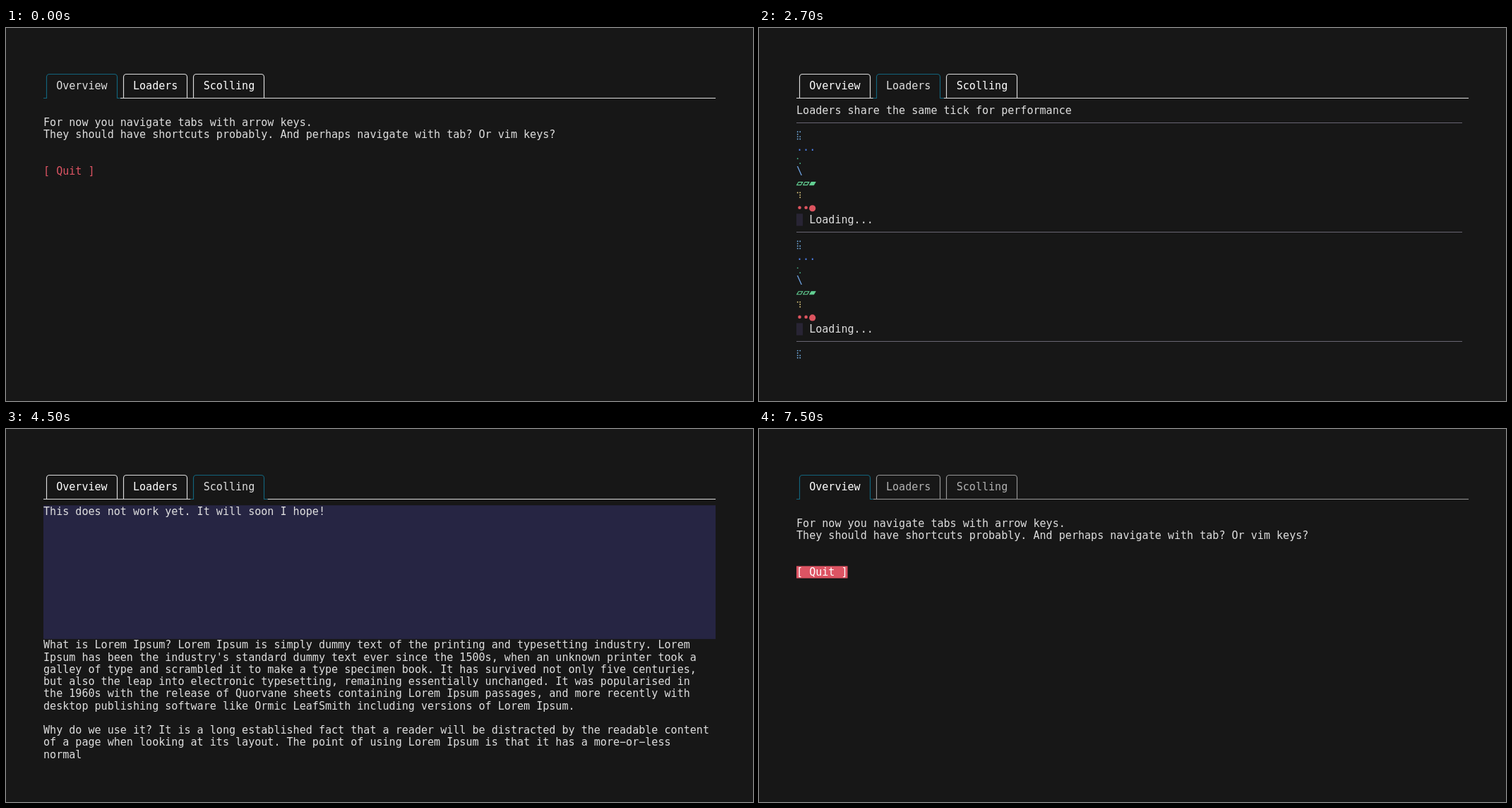
Write an HTML page with a canvas that moves like this. It is 1058 by 529 pixels and loops after 8 s.

```html
<!DOCTYPE html>
<html lang="en">
<head>
<meta charset="utf-8">
<title>Terminal tabs</title>
<style>
html, body { margin: 0; width: 100%; height: 100%; overflow: hidden; background: #171717; }
canvas { display: block; }
</style>
</head>
<body>
<canvas id="stage" width="1058" height="529"></canvas>
<script>
const ctx = document.getElementById('stage').getContext('2d');
const LOOP = 8000, CELL_W = 9.067, CELL_H = 17.24, COLS = 105;
const BG = '#171717', FG = '#dedede', BRIGHT = '#ffffff', DIM = '#b2b2b2';
const TEAL = '#12647c', RED = '#dd5463', RULE = '#686572', PANEL = '#262543';

const X = col => 53 + col * CELL_W;
const Y = row => 65.1 + row * CELL_H; // centre of a row
const snap = v => Math.floor(v) + 0.5;

function text(col, row, str, color = FG) {
  ctx.fillStyle = color;
  [...str.replaceAll('-', '\u2212')].forEach((ch, i) => ctx.fillText(ch, X(col + i), Y(row) + 5));
}

function cells(col, row, w, h, color) {
  ctx.fillStyle = color;
  ctx.fillRect(X(col), Y(row) - CELL_H / 2, w * CELL_W, h * CELL_H);
}

function line(color, ...points) {
  ctx.strokeStyle = color;
  ctx.beginPath();
  points.forEach(([x, y]) => ctx.lineTo(x, y));
  ctx.stroke();
}

function circle(x, y, r) {
  ctx.beginPath();
  ctx.arc(x, y, r, 0, 7);
  ctx.fill();
}

// Tabs: label, first column, last column
const TABS = [['Overview', 0, 11], ['Loaders', 12, 22], ['Scolling', 23, 34]];

function drawTabs(active, focused) {
  const top = snap(Y(0)), base = snap(Y(2));
  const edge = focused ? '#dcdcdc' : '#979797';
  const [, first, last] = TABS[active];
  if (first) line(edge, [X(0), base], [X(first), base]);
  line(edge, [X(last + 1), base], [X(COLS), base]);
  TABS.forEach(([label, a, b], i) => {
    const on = i === active, l = snap(X(a + 0.5) - 0.3), r = snap(X(b + 0.5) - 0.2);
    ctx.strokeStyle = on ? TEAL : edge;
    ctx.beginPath();
    if (on) ctx.moveTo(X(a), base);
    ctx.lineTo(l, base);
    ctx.arcTo(l, top, r, top, 4);
    ctx.arcTo(r, top, r, base, 4);
    ctx.lineTo(r, base);
    if (on) ctx.lineTo(X(b + 1), base);
    ctx.stroke();
    const color = on ? (focused ? FG : BRIGHT) : (focused ? BRIGHT : DIM);
    text(a + 2, 1, label, color);
  });
}

function drawOverview(quitFocused) {
  text(0, 4, 'For now you navigate tabs with arrow keys.');
  text(0, 5, 'They should have shortcuts probably. And perhaps navigate with tab? Or vim keys?');
  if (quitFocused) cells(0, 8, 8, 1, RED);
  text(0, 8, '[ Quit ]', quitFocused ? BRIGHT : RED);
}

function braille(row, ch, color) {
  const bits = ch.codePointAt(0) - 0x2800;
  ctx.fillStyle = color;
  for (let i = 0; i < 8; i++) {
    if (!(bits >> i & 1)) continue;
    const col = i < 6 ? Math.floor(i / 3) : i - 6;
    const dotRow = i < 6 ? i % 3 : 3;
    circle(54.7 + col * 3.5, Y(row) - 4 + dotRow * 3.4, 0.95);
  }
}

function meter(row, full) {
  const y = Y(row) + 0.3;
  ctx.fillStyle = ctx.strokeStyle = '#62cf92';
  for (let i = 0; i < 3; i++) {
    const x = X(i) + 0.7;
    ctx.beginPath();
    ctx.moveTo(x, y + 2);
    ctx.lineTo(x + 2.4, y - 2);
    ctx.lineTo(x + 8, y - 2);
    ctx.lineTo(x + 5.6, y + 2);
    ctx.closePath();
    if (i === full) ctx.fill();
    ctx.stroke();
  }
}

function points(row, big) {
  ctx.fillStyle = '#dc545f';
  for (let i = 0; i < 3; i++) {
    const on = i === big;
    circle(X(i + 0.5), Y(row) + (on ? 1 : 0), on ? 4.6 : 2.3);
  }
}

function pulse(row, step) {
  ctx.globalAlpha = [1, 0.75, 0.25, 0.125][step];
  cells(0, row, 1, 1, '#a27dfa');
  ctx.globalAlpha = 1;
  text(2, row, 'Loading...');
}

function drawLoaders(tick) {
  const step = (fps, count) => Math.floor(tick * fps / 15) % count;
  const pick = (list, fps = 15) => list[step(fps, list.length)];
  const parts = [
    row => braille(row, pick('⣾⣽⣻⢿⡿⣟⣯⣷'), '#6fa9dc'),
    row => text(0, row, '.'.repeat(1 + step(4, 3)), '#4d80ea'),
    row => braille(row, pick('⢄⢂⢁⡁⡈⡐⡠'), '#48b287'),
    row => text(0, row, pick('|/-\\', 8), '#70a5e6'),
    row => meter(row, step(6, 3)),
    row => braille(row, pick('⠋⠙⠹⠸⠼⠴⠦⠧⠇⠏'), '#dcc67c'),
    row => points(row, step(8, 4) - 1),
    row => pulse(row, step(8, 4)),
    row => line(RULE, [X(0), snap(Y(row))], [X(104), snap(Y(row))])
  ];
  text(0, 3, 'Loaders share the same tick for performance');
  for (let row = 4; row < 24; row++) parts[(row + 4) % 9](row);
}

const PARAGRAPHS = `What is Lorem Ipsum? Lorem Ipsum is simply dummy text of the printing and typesetting industry. Lorem
Ipsum has been the industry's standard dummy text ever since the 1500s, when an unknown printer took a
galley of type and scrambled it to make a type specimen book. It has survived not only five centuries,
but also the leap into electronic typesetting, remaining essentially unchanged. It was popularised in
the 1960s with the release of Quorvane sheets containing Lorem Ipsum passages, and more recently with
desktop publishing software like Ormic LeafSmith including versions of Lorem Ipsum.

Why do we use it? It is a long established fact that a reader will be distracted by the readable content
of a page when looking at its layout. The point of using Lorem Ipsum is that it has a more-or-less
normal`.split('\n');

function drawScrolling() {
  cells(0, 3, COLS, 11, PANEL);
  text(0, 3, 'This does not work yet. It will soon I hope!');
  PARAGRAPHS.forEach((str, i) => text(0, 14 + i, str));
}

// The loaders' shared tick stands still while another tab is open.
function tickAt(t) {
  if (t >= 5860) return 50 + Math.floor(Math.floor((t - 5860) / 40) / 1.7);
  const k = Math.floor((t - 1340) / 40);
  return Math.min(k, Math.floor((k + 1.75) / 1.62));
}

function draw(now) {
  const t = now % LOOP;
  ctx.fillStyle = BG;
  ctx.fillRect(0, 0, 1058, 529);
  ctx.font = '15.06px "DejaVu Sans Mono", monospace';
  ctx.lineWidth = 1.15;
  const quitFocused = (t >= 500 && t < 900) || t >= 7500;
  const tab = t < 1340 || t >= 6660 ? 0 : t >= 4500 && t < 5860 ? 2 : 1;
  drawTabs(tab, !quitFocused);
  if (tab === 0) drawOverview(quitFocused);
  else if (tab === 1) drawLoaders(tickAt(t));
  else drawScrolling();
}

function frame() {
  draw(performance.now());
  requestAnimationFrame(frame);
}
frame();
</script>
</body>
</html>
```
